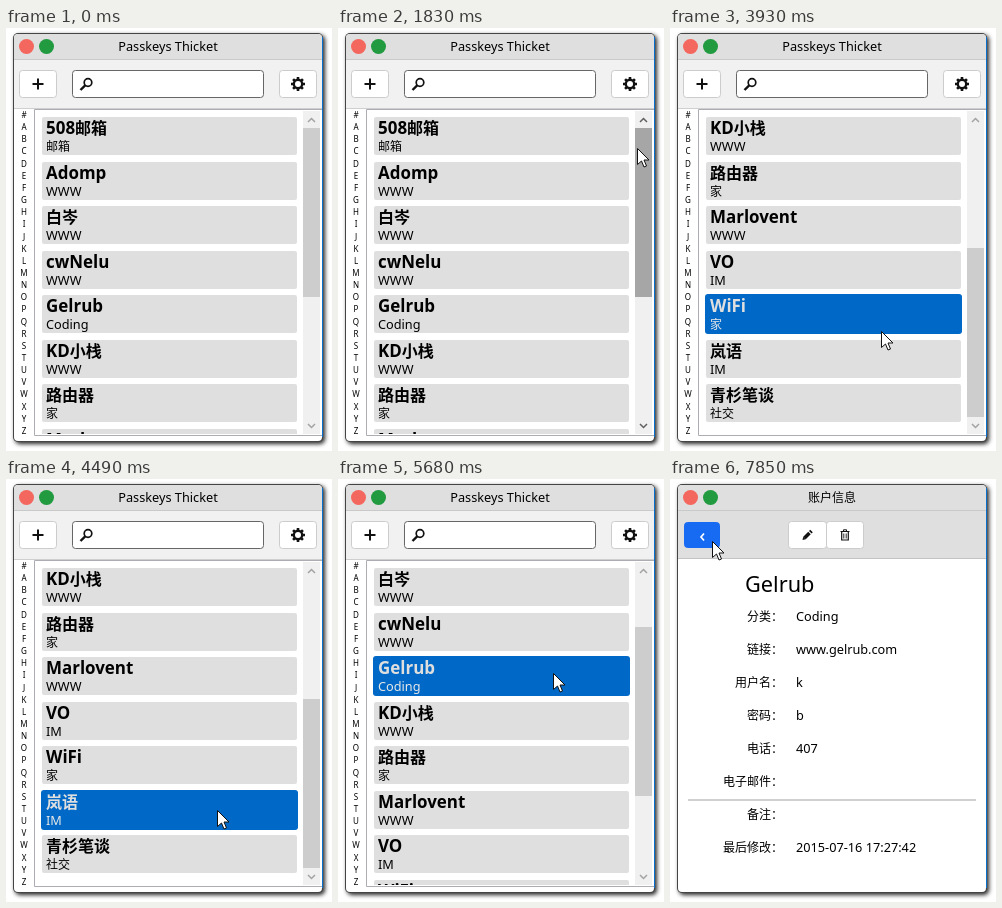
These frames come from a looping animation (326 px wide and 423 px high, 7990 ms). An HTML page with a canvas:

```html
<!DOCTYPE html>
<html lang="zh-CN">
<head>
<meta charset="utf-8">
<style>
html, body { margin: 0; width: 100%; height: 100%; overflow: hidden; background: #fff; }
canvas { display: block; width: 326px; height: 423px; }
</style>
</head>
<body>
<canvas id="stage" width="326" height="423"></canvas>
<script>
const ctx = document.getElementById('stage').getContext('2d', { alpha: false });
const LOOP = 7990, STEP = 70, START = 500, DETAIL_AT = 6100;
const LATIN = '"Noto Sans", "Open Sans", sans-serif';
const HAN = '"Noto Sans CJK SC", "Noto Sans CJK", sans-serif';

const accounts = [
  ['508邮箱', '邮箱'], ['Adomp', 'WWW'], ['白岑', 'WWW'], ['cwNelu', 'WWW'],
  ['Gelrub', 'Coding'], ['KD小栈', 'WWW'], ['路由器', '家'], ['Marlovent', 'WWW'],
  ['VO', 'IM'], ['WiFi', '家'], ['岚语', 'IM'], ['青杉笔谈', '社交']
];
const details = [
  ['分类', 'Coding'], ['链接', 'www.gelrub.com'], ['用户名', 'k'], ['密码', 'b'],
  ['电话', '407'], ['电子邮件', ''], ['备注', ''], ['最后修改', '2015-07-16 17:27:42']
];

// Pointer path: time, x, y
const path = [
  [500, 0, 52], [920, 190, 50], [990, 190, 50], [1830, 299, 120], [1900, 299, 120],
  [2040, 287, 124], [2460, 262, 160], [2530, 262, 160], [2810, 256, 172], [3020, 238, 196],
  [3090, 238, 196], [3510, 214, 288], [3650, 214, 288], [3930, 211, 303], [4210, 213, 362],
  [4490, 211, 331], [4840, 212, 296], [4980, 212, 296], [5680, 215, 194], [6310, 215, 194],
  [6590, 178, 104], [7150, 230, 347], [7850, 42, 62]
];
// Wheel turns: time, first visible row
const wheel = [[0, 0], [2600, 3], [3160, 5], [4560, 2]];

function pointerAt(t) {
  if (t < path[0][0]) return { x: -50, y: -50 };
  const next = path.findIndex(key => key[0] > t);
  if (next < 0) return { x: 42, y: 62 };
  const [t0, x0, y0] = path[next - 1], [t1, x1, y1] = path[next];
  const u = (t - t0) / (t1 - t0), e = u * u * (3 - 2 * u);
  return { x: x0 + (x1 - x0) * e, y: y0 + (y1 - y0) * e };
}

const inside = (p, x, y, w, h) => p.x >= x && p.x < x + w && p.y >= y && p.y < y + h;

function rect(x, y, w, h, color) {
  ctx.fillStyle = color;
  ctx.fillRect(x, y, w, h);
}

function box(x, y, w, h, r, fill, border) {
  const inset = border ? 0.5 : 0;
  ctx.beginPath();
  ctx.roundRect(x + inset, y + inset, w - 2 * inset, h - 2 * inset, r);
  if (fill) { ctx.fillStyle = fill; ctx.fill(); }
  if (border) { ctx.strokeStyle = border; ctx.lineWidth = 1; ctx.stroke(); }
}

function dot(x, y, r, color) {
  ctx.fillStyle = color;
  ctx.beginPath();
  ctx.arc(x, y, r, 0, 7);
  ctx.fill();
}

function line(points, color, width) {
  ctx.strokeStyle = color;
  ctx.lineWidth = width;
  ctx.beginPath();
  points.forEach(([x, y]) => ctx.lineTo(x, y));
  ctx.stroke();
}

// Latin runs are set slightly larger than Chinese ones
function text(str, x, y, size, { color = '#000', weight = 400, align = 0 } = {}) {
  const runs = str.split(/([\u3000-\uffef]+)/).filter(Boolean).map(s => {
    const han = s > '\u3000';
    const font = `${weight} ${han ? size : size * 1.06}px ${han ? HAN : LATIN}`;
    ctx.font = font;
    return { s, font, w: ctx.measureText(s).width };
  });
  x -= align * runs.reduce((sum, run) => sum + run.w, 0);
  ctx.fillStyle = color;
  for (const run of runs) {
    ctx.font = run.font;
    ctx.fillText(run.s, x, y);
    x += run.w;
  }
}

// Button that turns blue under the pointer; icon is drawn around its centre
function button(p, x, y, w, h, icon) {
  const hot = inside(p, x, y, w, h);
  box(x, y, w, h, 3, hot ? '#176bf3' : '#fff', hot ? '#176bf3' : '#ccc');
  ctx.save();
  ctx.translate(x + w / 2, y + h / 2);
  icon(hot ? '#fff' : '#111', hot ? '#176bf3' : '#fff');
  ctx.restore();
}

function plusIcon(color) {
  rect(-5.5, -1, 11, 2, color);
  rect(-1, -5.5, 2, 11, color);
}

function gearIcon(color, back) {
  for (let i = 0; i < 8; i++) {
    const a = i * Math.PI / 4, c = Math.cos(a), s = Math.sin(a);
    line([[4 * c, 4 * s], [7 * c, 7 * s]], color, 2.6);
  }
  dot(0, 0, 5.4, color);
  dot(0, 0, 3, back);
}

function backIcon(color) {
  line([[2, -1.5], [-1, 2], [2, 5.5]], color, 1.7);
}

function pencilIcon(color) {
  line([[-3, 3], [2, -2]], color, 3.6);
  line([[2.8, -2.8], [4, -4]], color, 3.6);
  ctx.fillStyle = color;
  ctx.beginPath();
  ctx.moveTo(-5, 5);
  ctx.lineTo(-4.3, 1.7);
  ctx.lineTo(-1.7, 4.3);
  ctx.fill();
}

function trashIcon(color) {
  line([[-4.5, -3.5], [4.5, -3.5]], color, 1.2);
  line([[-1.5, -3.5], [-1.5, -5.2], [1.5, -5.2], [1.5, -3.5]], color, 1);
  line([[-3.3, -3], [-3.3, 5], [3.3, 5], [3.3, -3]], color, 1.2);
  for (const x of [-1.2, 1.2]) line([[x, -1.5], [x, 3.5]], color, 0.9);
}

function drawWindow(title) {
  rect(0, 0, 326, 423, '#fff');
  ctx.save();
  ctx.shadowColor = 'rgba(0,0,0,.85)';
  ctx.shadowBlur = 4;
  ctx.shadowOffsetX = ctx.shadowOffsetY = 2;
  box(7, 5, 310, 409, 5, '#444');
  ctx.restore();
  box(8, 6, 308, 407, 4, '#fff');
  rect(316, 9, 1, 400, '#0870cc');
  ctx.beginPath();
  ctx.roundRect(8, 6, 308, 407, 4);
  ctx.clip();
  rect(8, 6, 308, 26, '#dfdfdf');
  rect(8, 31, 308, 1, '#c9c9c9');
  dot(20.5, 18.5, 7.5, '#f4675e');
  dot(40.5, 18.5, 7.5, '#219a40');
  text(title, 162, 23, 12, { align: 0.5 });
}

function drawScrollbar(p, first) {
  const hot = inside(p, 297, 83, 17, 323), arrow = hot ? '#606060' : '#a3a3a3';
  rect(297, 83, 17, 323, '#f0f0f0');
  rect(297, 100 + 24 * first, 17, 169, hot ? '#a6a6a6' : '#cdcdcd');
  line([[302, 94], [305.5, 90.5], [309, 94]], arrow, 1.5);
  line([[302, 396], [305.5, 399.5], [309, 396]], arrow, 1.5);
}

function drawList(p, first) {
  rect(8, 32, 308, 48, '#f1f1f1');
  rect(8, 80, 308, 1, '#cfcfcf');
  button(p, 13, 42, 38, 28, plusIcon);
  button(p, 273, 42, 38, 28, gearIcon);
  box(66, 42, 192, 28, 3, '#fff', inside(p, 66, 42, 192, 28) ? '#176bf3' : '#666');
  ctx.strokeStyle = '#111';
  ctx.lineWidth = 1.7;
  ctx.beginPath();
  ctx.arc(82, 54.5, 3.8, 0, 7);
  ctx.stroke();
  line([[79.2, 57.3], [74.5, 62]], '#111', 2.4);

  [...'#ABCDEFGHIJKLMNOPQRSTUVWXYZ'].forEach((letter, i) =>
    text(letter, 18, 90 + 12.15 * i, 7.6, { align: 0.5 }));

  box(28, 81, 289, 327, 0, '#fff', '#abadb3');
  ctx.save();
  ctx.beginPath();
  ctx.rect(29, 82, 287, 324);
  ctx.clip();
  accounts.slice(first, first + 8).forEach(([name, kind], i) => {
    const y = Math.round(89 + 44.5 * i);
    const hot = inside(p, 35, y - 1, 257, 40);
    if (hot) box(35, y - 1, 257, 40, 3, '#0068c6');
    else box(36, y, 255, 38, 2, '#dfdfdf');
    text(name, 40, y + 17, 16, { weight: 700, color: hot ? '#dfdfdf' : '#000' });
    text(kind, 40, y + 34, 12, { color: hot ? '#e8e8e8' : '#000' });
  });
  drawScrollbar(p, first);
  ctx.restore();
}

const fields = [[72, 90, 224, 30], ...details.slice(0, 7).map((_, i) => [120, 126 + 33 * i, 176, 23])];

function drawDetail(p) {
  rect(8, 32, 308, 47, '#dfdfdf');
  rect(8, 79, 308, 1, '#c4c4c4');
  button(p, 14, 43, 36, 26, backIcon);
  button(p, 118, 42, 39, 28, pencilIcon);
  button(p, 156, 42, 38, 28, trashIcon);
  for (const f of fields) if (inside(p, ...f)) box(...f, 0, null, '#7eb4ea');
  text('Gelrub', 75, 113, 20.5);
  details.forEach(([label, value], i) => {
    const y = 142 + 33 * i;
    text(label + '：', 113, y, 12, { align: 1 });
    text(value, 126, y, 12);
  });
  rect(18, 320, 288, 2, '#d0d0d0');
}

function drawPointer(p, beam) {
  ctx.save();
  ctx.translate(Math.round(p.x), Math.round(p.y));
  if (beam) {
    rect(0, -8, 1, 16, '#000');
    for (const y of [-8, 7]) rect(-3, y, 7, 1, '#000');
  } else {
    ctx.translate(0.5, 0.5);
    ctx.beginPath();
    [[0, 0], [0, 16], [4, 12.5], [6.5, 18.5], [9, 17.5], [6.5, 11.5], [11.5, 11.5]]
      .forEach(([x, y]) => ctx.lineTo(x, y));
    ctx.closePath();
    ctx.fillStyle = '#fff';
    ctx.fill();
    ctx.strokeStyle = '#111';
    ctx.lineWidth = 1;
    ctx.stroke();
  }
  ctx.restore();
}

function draw(time) {
  const t = START + Math.floor((time % LOOP - START) / STEP) * STEP;
  const p = pointerAt(t), detail = t >= DETAIL_AT;
  const first = wheel.filter(([at]) => at <= Math.max(t, 0)).pop()[1];
  ctx.save();
  drawWindow(detail ? '账户信息' : 'Passkeys Thicket');
  if (detail) drawDetail(p);
  else drawList(p, first);
  ctx.restore();
  const textAreas = detail ? fields : [[66, 42, 192, 28]];
  drawPointer(p, textAreas.some(area => inside(p, ...area)));
}

const began = performance.now();
function frame() {
  draw(performance.now() - began);
  requestAnimationFrame(frame);
}
frame();
</script>
</body>
</html>
```
